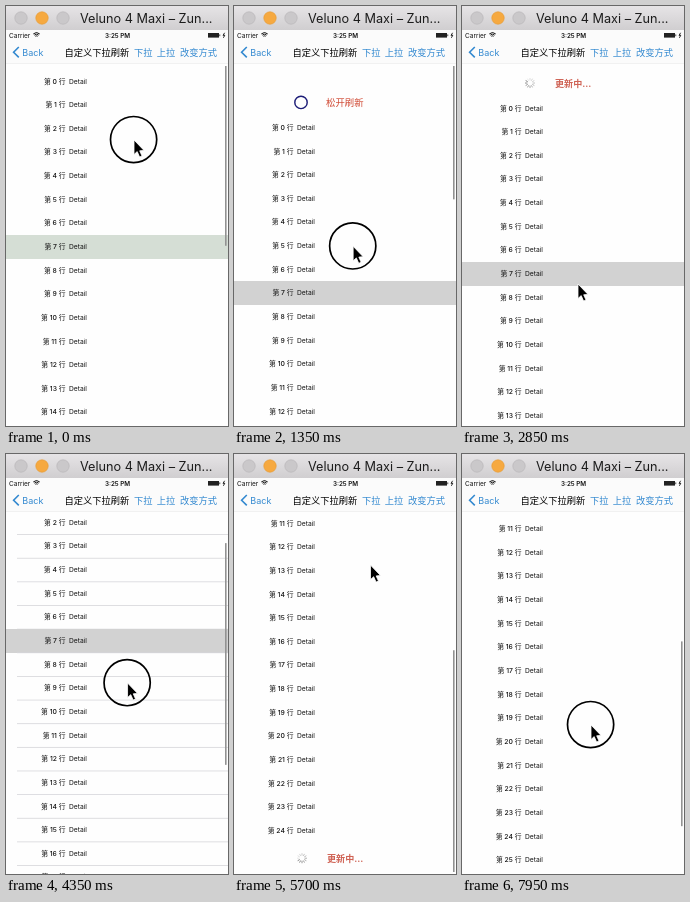
Write an HTML page with a canvas that moves like this. It is 222 px wide and 420 px high and loops after 8 s.

```html
<!DOCTYPE html>
<html lang="zh">
<head>
<meta charset="utf-8">
<style>
html, body { margin: 0; width: 222px; height: 420px; overflow: hidden; background: #fff; }
canvas { display: block; width: 222px; height: 420px; }
</style>
</head>
<body>
<canvas id="stage"></canvas>
<script>
const W = 222, H = 420, LOOP = 8000, STEP = 150;
const NAV = 58, REST = 70, ROW = 23.64, VIEW = H - NAV, PULL = 32;
const BLUE = '#3389d0', FONT = 'Inter, "Noto Sans CJK SC", "Noto Sans CJK", sans-serif';
const stage = document.getElementById('stage');
const c = stage.getContext('2d');
const ratio = window.devicePixelRatio || 1;
stage.width = W * ratio;
stage.height = H * ratio;

const within = (t, ...spans) => spans.some(([a, b]) => t >= a && t < b);

function ease(t, from, to) {
  const u = Math.min(1, Math.max(0, (t - from) / (to - from)));
  return u * u * (3 - 2 * u);
}

// Pulling past the top gets harder with distance.
const rubber = d => d / (1.774 + 0.00485 * d);

function scrollOffset(t) {
  return -5 - rubber(144 * ease(t, 200, 1930))
    + 31.2 * ease(t, 1930, 2250)   // settle on the refresher
    + PULL * ease(t, 3300, 3600)   // hide it
    + 247 * ease(t, 4050, 5100)    // drag to the end
    + 14 * ease(t, 5100, 5400)     // show the footer
    - 30.6 * ease(t, 6150, 6450)   // hide it
    + 25 * ease(t, 7400, 7950);    // drag on into the new rows
}

function pointerAt(t) {
  const down = ease(t, 200, 1930), up = ease(t, 4050, 5100);
  const back = ease(t, 5250, 6600), again = ease(t, 6900, 7950);
  return [
    128 - 12 * down + 28 * up - 29 * back + 14 * again,
    134 + 144 * down - 247 * up + 309 * back - 69 * again
  ];
}

function text(s, x, y, size, color = '#111', weight = 400, align = 'left') {
  c.font = `${weight} ${size}px ${FONT}`;
  c.fillStyle = color;
  c.textAlign = align;
  c.fillText(s, x, y);
}

function rect(x, y, w, h, color) {
  c.fillStyle = color;
  c.fillRect(x, y, w, h);
}

function arc(x, y, r, from, to, color, width, fill) {
  c.beginPath();
  c.arc(x, y, r, from, to);
  if (fill) {
    c.fillStyle = fill;
    c.fill();
  }
  c.strokeStyle = color;
  c.lineWidth = width;
  c.stroke();
}

function path(points, color, width, fill) {
  c.beginPath();
  points.forEach(([x, y]) => c.lineTo(x, y));
  if (fill) {
    c.closePath();
    c.fillStyle = fill;
    c.fill();
  }
  c.strokeStyle = color;
  c.lineWidth = width;
  c.stroke();
}

function spinner(x, y, t) {
  for (let i = 0; i < 12; i++) {
    const a = i * Math.PI / 6, dx = Math.sin(a), dy = -Math.cos(a);
    const age = (Math.floor(t / 83) - i + 12) % 12;
    path([[x + dx * 2.6, y + dy * 2.6], [x + dx * 5, y + dy * 5]], `rgba(90,90,90,${0.75 - age * 0.055})`, 1);
  }
}

function refresher(y, pull, busy, t, labels) {
  if (busy) {
    spinner(68, y, t);
    text('更新中...', 93, y + 3.5, 9.1, '#cf6254', 700);
    return;
  }
  const p = Math.min(1, Math.max(0, pull / PULL));
  arc(67, y, 6.2, 0, 7, '#d9d9e2', 1);
  arc(67, y, 6.2, -Math.PI / 2, (p * 2 - 0.5) * Math.PI, '#1d1d78', 1.4);
  const color = p < 1 ? `rgb(${150 * p},${55 * p},${48 * p})` : '#cf4630';
  text(labels[p < 1 ? 0 : 1], 92, y + 3.5, 9.4, color);
}

function list(t, top, count) {
  const lines = within(t, [300, 1200], [4350, 5300]);
  for (let i = 0; i < count; i++) {
    const y = top + i * ROW;
    if (y < NAV - ROW || y > H + ROW) continue;
    if (i === 7) rect(0, Math.round(y - ROW / 2), W, 24, t < STEP ? '#d5ded5' : '#d2d2d2');
    if (lines) rect(11, y + ROW / 2, W - 11, 0.8, '#d6d6da');
    text(`第 ${i} 行`, 59.5, y + 2.5, 6.8, '#111', 500, 'right');
    text('Detail', 63, y + 2.5, 6.7);
  }
}

function scrollbar(offset, count) {
  const size = count * ROW, length = VIEW * VIEW / size;
  const p = Math.min(1, Math.max(0, offset / (size - VIEW)));
  rect(219, 60 + p * (H - 62 - length), 1.6, length + Math.min(0, offset), '#929292');
}

function bars() {
  rect(0, 24, W, NAV - 24, '#fbfbfb');
  rect(0, NAV - 0.5, W, 0.5, '#e6e6e6');

  const shade = c.createLinearGradient(0, 0, 0, 24);
  shade.addColorStop(0, '#e6e4e6');
  shade.addColorStop(1, '#d0ced0');
  rect(0, 0, W, 24, shade);
  ['#cac8ca', '#f6a940', '#cac8ca'].forEach((color, i) =>
    arc(15 + i * 21, 12, 6.2, 0, 7, i === 1 ? '#e79c38' : '#b9b7b9', 0.7, color));
  text('Veluno 4 Maxi – Zun...', 74, 17, 12.7, '#1c1c1c');

  text('Carrier', 3, 31.6, 6.5);
  for (const r of [1.6, 3.2, 4.8]) arc(30.5, 31.5, r, -2.3, -0.84, '#111', 1);
  text('3:25 PM', 111.5, 31.6, 6.3, '#111', 600, 'center');
  rect(202, 27, 11, 4.6, '#222');
  rect(213.4, 28.4, 0.8, 1.8, '#222');
  path([[218.6, 26.8], [217, 29.4], [218.8, 29.2], [217.4, 31.8]], '#111', 0.9);

  path([[12.8, 41], [7.6, 46.2], [12.8, 51.4]], BLUE, 1.6);
  text('Back', 16.3, 49.6, 9, BLUE);
  text('自定义下拉刷新', 58.5, 49.7, 9.25, '#000', 500);
  text('下拉', 128, 49.7, 9.25, BLUE);
  text('上拉', 150.7, 49.7, 9.25, BLUE);
  text('改变方式', 174, 49.7, 9.25, BLUE);
}

function cursor(t) {
  const [x, y] = pointerAt(t);
  if (within(t, [0, 1930], [4050, 5250], [7400, LOOP])) arc(x - 0.4, y - 0.4, 23.1, 0, 7, '#000', 1.7);
  const shape = [[0, 0], [0, 14.5], [3.2, 11.6], [5.6, 17], [8, 16], [5.7, 10.8], [10, 10.4]];
  path(shape.map(([a, b]) => [x + a, y + b]), '#fff', 0.8, '#000');
}

function draw(t) {
  const offset = scrollOffset(t), top = REST - offset;
  const count = within(t, [3300, 6200]) ? 25 : 30;
  c.setTransform(ratio, 0, 0, ratio, 0, 0);
  rect(0, 0, W, H, '#fefefe');
  if (offset < 0) refresher(top - 25, -offset, within(t, [1930, 3600]), t, ['下拉刷新', '松开刷新']);
  list(t, top, count);
  if (count === 25) {
    const foot = top + 24.5 * ROW + PULL / 2;
    refresher(foot, offset - count * ROW + VIEW, t >= 5250, t, ['上拉刷新', '松开刷新']);
  }
  if (within(t, [0, 2100], [4050, 6400], [7400, LOOP])) scrollbar(offset, count);
  bars();
  cursor(t);
}

function tick() {
  const t = performance.now() % LOOP;
  draw(Math.floor(t / STEP) * STEP);
  requestAnimationFrame(tick);
}
tick();
</script>
</body>
</html>
```
